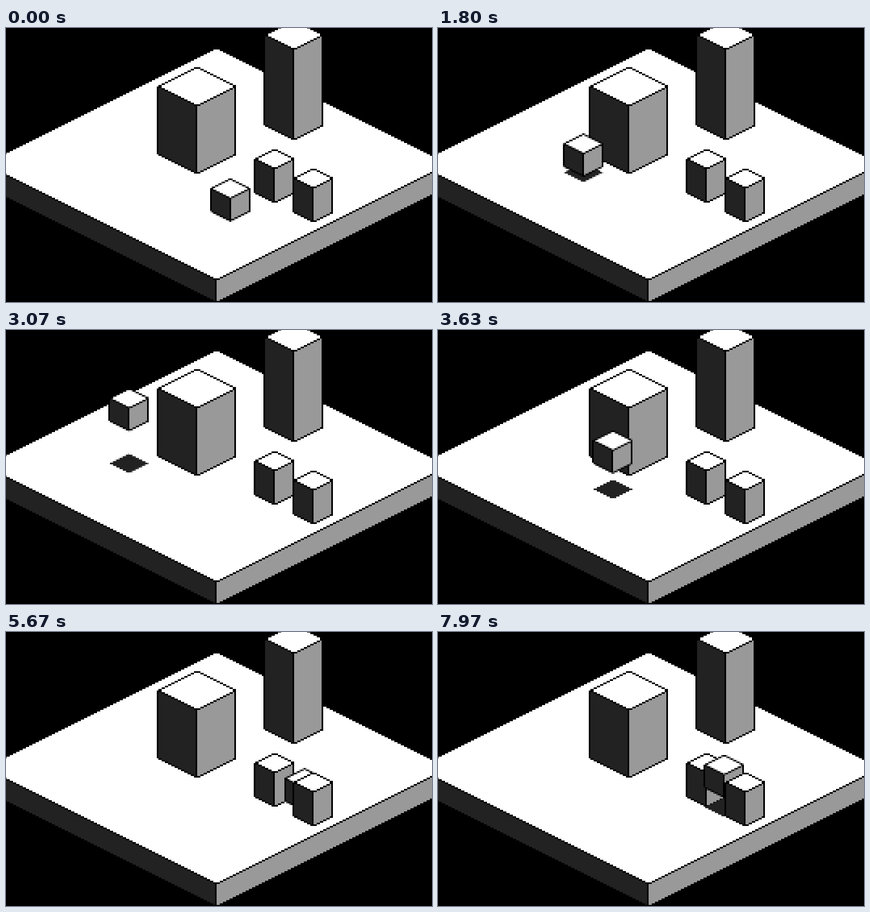
An HTML page without scripts that plays this animation: 791 by 510 pixels, repeating every 8 s.

```html
<!DOCTYPE html>
<html lang="en">
<head>
<meta charset="utf-8">
<title>Isometric hopping cube</title>
<style>
  html, body { margin: 0; width: 100%; height: 100%; overflow: hidden; background: #000; }
  svg { display: block; width: 791px; height: 510px; }

  path { shape-rendering: crispEdges; }
  .top { fill: #fff; }
  .left, .shadow { fill: #222; }
  .right { fill: #999; }
  .edges, .posts { fill: none; stroke: #000; stroke-linejoin: bevel; }
  /* Slanted lines are one art pixel high; upright lines sit left of their corner */
  .edges { stroke-width: .89; }
  .posts { stroke-width: 1; transform: translateX(-.25px); }

  .walker { animation: walk 8s linear infinite; }
  .hopper { animation: hop 8s linear infinite; }
  .front { animation: reveal 8s step-end infinite; }

  /* Ground position of the cube's front corner, in art pixels */
  @keyframes walk {
    0%, 13% { transform: translate(138.6px, 119.4px); }
    23.27%, 26.25% { transform: translate(85.9px, 93.35px); }
    32.5%, 34.19% { transform: translate(53.8px, 77.4px); }
    38.375% { transform: translate(75.8px, 88.4px); }
    44%, 44.45% { transform: translate(103.6px, 102.3px); }
    53.625% { transform: translate(146.3px, 123.55px); }
    56.25%, 60.35% { transform: translate(159.8px, 116.8px); }
    62.625%, 66.375% { transform: translate(168.4px, 121.1px); }
    66.875% { transform: translate(165.8px, 119.8px); }
    73.625%, 76.81% { transform: translate(197px, 104.2px); }
    78.275% { transform: translate(204.4px, 100.5px); }
    83.875%, 87% { transform: translate(174.7px, 115.35px); }
    87.125%, 100% { transform: translate(176.8px, 114.3px); }
  }

  /* Each hop: sharp rise, long hang, sharp fall */
  @keyframes hop {
    0%, 13.06%, 22.69%, 23.31%, 32.81%, 35%, 44.54%, 54.25%, 90.69% {
      transform: translateY(0);
      animation-timing-function: cubic-bezier(.22, 1, .36, 1);
    }
    17.875%, 28.06%, 39.81%, 49.44%, 95.5% {
      transform: translateY(-26.5px);
      animation-timing-function: cubic-bezier(.5, 0, .75, 0);
    }
    100% { transform: translateY(-6.3px); }
  }

  /* The near post covers the cube once it enters the gap */
  @keyframes reveal {
    0% { visibility: hidden; }
    66.7%, 100% { visibility: visible; }
  }
</style>
</head>
<body>
<svg viewBox="0 0 791 510">
  <defs>
    <!-- Samples the centre of each 3px cell and spreads it over the cell -->
    <filter id="pixelate" filterUnits="userSpaceOnUse" x="-2" y="-2" width="795" height="516" color-interpolation-filters="sRGB">
      <feFlood x="-1" y="-1" width="1" height="1"/>
      <feOffset x="-2" y="-2" width="3" height="3"/>
      <feTile result="dots"/>
      <feComposite in="SourceGraphic" in2="dots" operator="in"/>
      <feMorphology operator="dilate" radius="1"/>
    </filter>

    <!-- Blocks are drawn from their front ground corner -->
    <g id="post">
      <path class="top" d="M0-21l12-6-12-6-12 6z"/>
      <path class="left" d="M0 0v-21l-12-6v21z"/>
      <path class="right" d="M0 0v-21l12-6v21z"/>
      <path class="edges" d="M0-21l12-6-12-6-12 6zM-12-6L0 0l12-6"/>
      <path class="posts" d="M-12-6v-21M0 0v-21M12-6v-21"/>
    </g>
  </defs>

  <g filter="url(#pixelate)">
    <g transform="translate(1 1) scale(3)">
      <g transform="translate(130 170)">
        <path class="top" d="M0-14l144-72-144-72-144 72z"/>
        <path class="left" d="M0 0v-14l-144-72v14z"/>
        <path class="right" d="M0 0v-14l144-72v14z"/>
        <path class="edges" d="M0-14l144-72-144-72-144 72zM-144-72L0 0l144-72"/>
        <path class="posts" d="M0 0v-14"/>
      </g>

      <g transform="translate(178 69)">
        <path class="top" d="M0-56l18-9-18-9-18 9z"/>
        <path class="left" d="M0 0v-56l-18-9v56z"/>
        <path class="right" d="M0 0v-56l18-9v56z"/>
        <path class="edges" d="M0-56l18-9-18-9-18 9zM-18-9L0 0l18-9"/>
        <path class="posts" d="M-18-9v-56M0 0v-56M18-9v-56"/>
      </g>

      <g transform="translate(118 90)">
        <path class="top" d="M0-42l24-12-24-12-24 12z"/>
        <path class="left" d="M0 0v-42l-24-12v42z"/>
        <path class="right" d="M0 0v-42l24-12v42z"/>
        <path class="edges" d="M0-42l24-12-24-12-24 12zM-24-12L0 0l24-12"/>
        <path class="posts" d="M-24-12v-42M0 0v-42M24-12v-42"/>
      </g>

      <use href="#post" x="166" y="108"/>
      <use href="#post" x="190" y="120"/>

      <g class="walker">
        <path class="shadow" d="M0 0l12-6-12-6-12 6z"/>
        <g class="hopper">
          <path class="top" d="M0-14l12-6-12-6-12 6z"/>
          <path class="left" d="M0 0v-14l-12-6v14z"/>
          <path class="right" d="M0 0v-14l12-6v14z"/>
          <path class="edges" d="M0-14l12-6-12-6-12 6zM-12-6L0 0l12-6"/>
          <path class="posts" d="M-12-6v-14M0 0v-14M12-6v-14"/>
        </g>
      </g>

      <use class="front" href="#post" x="190" y="120"/>
    </g>
  </g>
</svg>
</body>
</html>
```
